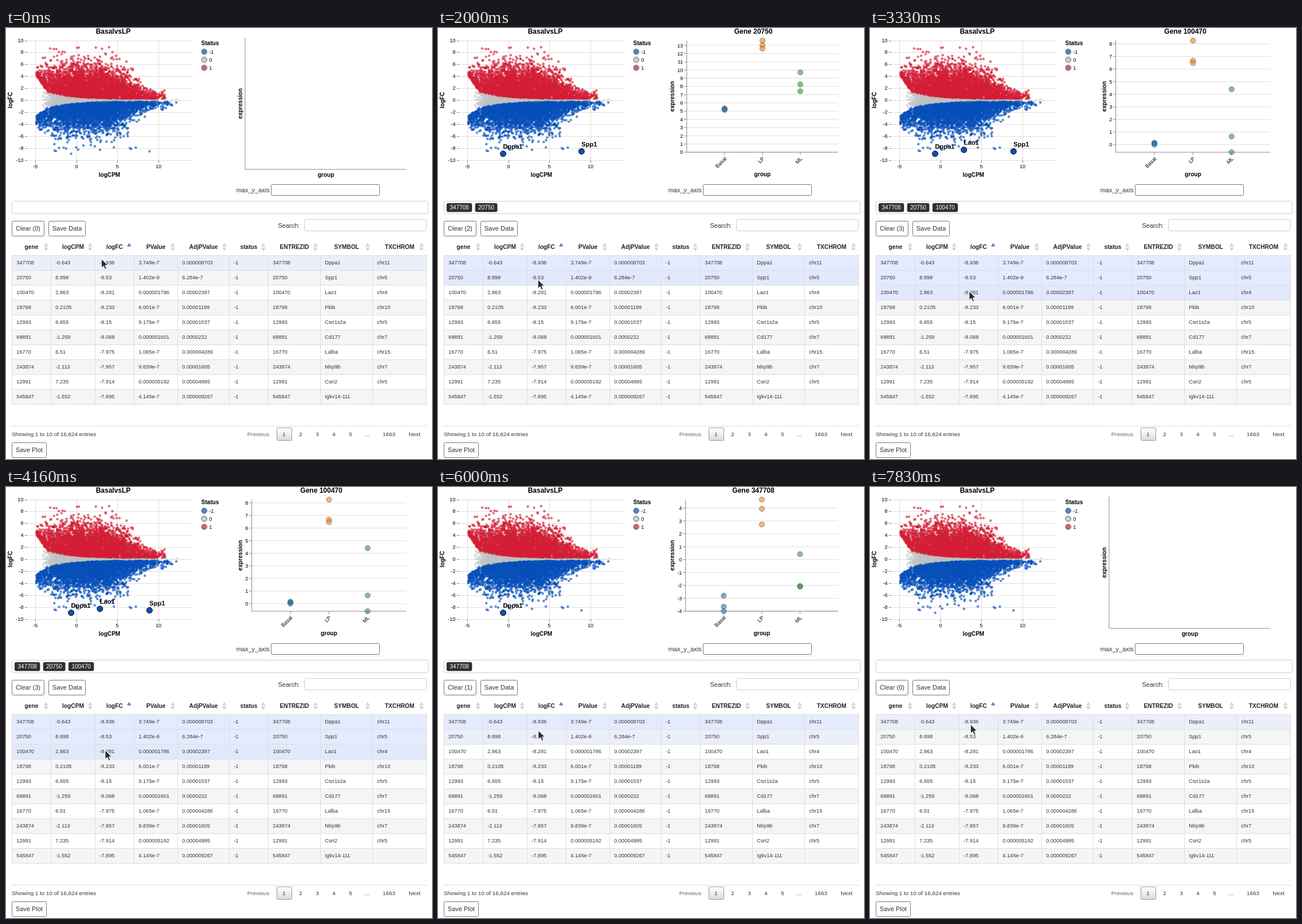
These frames come from a looping animation (743 px wide and 753 px high, 8000 ms). An HTML page with a canvas:

```html
<!DOCTYPE html>
<html lang="en">
<head>
<meta charset="utf-8">
<title>Gene explorer</title>
<style>
  html, body { margin: 0; width: 100%; height: 100%; overflow: hidden; background: #fff; }
  canvas, svg { position: absolute; left: 0; top: 0; width: 743px; height: 753px; }
  text { font-family: "Liberation Sans", Arial, sans-serif; white-space: pre; }
</style>
</head>
<body>
<canvas id="cloud" width="743" height="753"></canvas>
<svg id="stage" viewBox="0 0 743 753">
  <defs>
    <linearGradient id="pressed" x2="0" y2="1">
      <stop offset="0" stop-color="#fff"/><stop offset="1" stop-color="#dcdcdc"/>
    </linearGradient>
  </defs>
</svg>
<script>
const stage = document.getElementById('stage');
const BLUE = '#0850ba', SILVER = '#c0c0c0', RED = '#d21f35';
const LOOP = 8000;

// --- drawing helpers ---
function add(parent, tag, attrs, content) {
  const node = document.createElementNS('http://www.w3.org/2000/svg', tag);
  for (const key in attrs) node.setAttribute(key, attrs[key]);
  if (content !== undefined) node.textContent = content;
  parent.appendChild(node);
  return node;
}
// y is the vertical middle of the capitals
const label = (parent, x, y, content, size, attrs = {}) =>
  add(parent, 'text', { x, y: Math.round(y + size * .36), 'font-size': size, fill: '#333', ...attrs }, content);
const bold = { 'font-weight': 'bold', fill: '#000' };
const mid = { 'text-anchor': 'middle' };
const end = { 'text-anchor': 'end' };
const line = (parent, x1, y1, x2, y2, stroke) =>
  add(parent, 'line', { x1, y1, x2, y2, stroke });
const box = (parent, x, y, width, height, stroke, rx = 2, fill = '#fff') =>
  add(parent, 'rect', { x, y, width, height, rx, stroke, fill });
const group = parent => add(parent, 'g', {});
const turned = (parent, x, y, content) =>
  label(parent, 0, 0, content, 10.1, { ...bold, ...mid, transform: `translate(${x} ${y}) rotate(-90)` });

// --- left plot ---
const px = v => 122.8 + v * 14.33;
const py = v => 126.2 - v * 10.47;

function seeded(seed) {
  return () => {
    seed = (seed + 0x6D2B79F5) | 0;
    let t = Math.imul(seed ^ seed >>> 15, 1 | seed);
    t = t + Math.imul(t ^ t >>> 7, 61 | t) ^ t;
    return ((t ^ t >>> 14) >>> 0) / 4294967296;
  };
}

function drawCloud() {
  const ctx = document.getElementById('cloud').getContext('2d');
  const random = seeded(41);
  const gauss = () => Math.sqrt(-2 * Math.log(1 - random())) * Math.cos(2 * Math.PI * random());
  const dot = (v, value, r) => {
    ctx.beginPath();
    ctx.arc(px(v), py(value), r, 0, 2 * Math.PI);
    ctx.fill();
  };
  // smallest coloured value, and the height the bulk of the cloud reaches
  const edge = v => .22 + 1.1 * Math.exp(-(v + 3.3) / 3);
  const reach = v => 1.3 + 5.8 / (1 + Math.exp((v - 7) / 1.1)) - Math.max(0, -3 - v);

  ctx.strokeStyle = '#ddd';
  ctx.beginPath();
  for (let v = -10; v <= 10; v += 2) {
    const y = Math.round(py(v)) + .5;
    ctx.moveTo(37, y); ctx.lineTo(324, y);
  }
  for (let v = -5; v <= 10; v += 5) {
    const x = Math.round(px(v)) + .5;
    ctx.moveTo(x, 21); ctx.lineTo(x, 231);
  }
  ctx.stroke();

  ctx.fillStyle = SILVER;
  ctx.globalAlpha = .75;
  for (let i = 0; i < 8000; i++) {
    const v = .5 + 3.7 * gauss();
    if (v > -4.2 && v < 13 && random() < (v + 4.2) * .8)
      dot(v, (random() * 2 - 1) * Math.min(edge(v) + .1, 1.5), .9);
  }

  function side(color, sign, count, height, lift, rightmost) {
    ctx.fillStyle = color;
    ctx.globalAlpha = .65;
    for (let i = 0; i < count; i++) {
      const v = 1.8 + 3.65 * gauss();
      const low = edge(v) * (.9 + .2 * random()) + Math.max(0, -3.5 - v) * lift;
      const stretch = random() < .012 ? 1.5 : 1;
      const value = low + Math.max(.5, reach(v) * height - low) * Math.abs(gauss()) * .39 * stretch;
      if (v > -4.9 && v < rightmost && value < 9.4) dot(v, sign * value, 2.2);
    }
  }
  side(BLUE, -1, 3500, .9, .4, 12.3);
  side(RED, 1, 3700, 1, 1.5, 10.8);
  ctx.fillStyle = BLUE;
  for (const [id, cpm, fc] of genes) dot(+cpm, +fc, 2.2);
}

function drawLeftAxes(g) {
  for (let v = -10; v <= 10; v += 2) {
    const y = Math.round(py(v));
    line(g, 32.5, y + .5, 37, y + .5, '#888');
    label(g, 30.5, y, v, 9.2, { ...end, fill: '#000' });
  }
  for (let v = -5; v <= 10; v += 5) {
    const x = Math.round(px(v));
    line(g, x + .5, 231, x + .5, 236, '#888');
    label(g, x, 242, v, 9.2, { ...mid, fill: '#000' });
  }
  label(g, 187, 6, 'BasalvsLP', 12, { ...bold, ...mid });
  label(g, 180.5, 256, 'logCPM', 10.1, { ...bold, ...mid });
  turned(g, 6.5, 126, 'logFC');
  label(g, 340.5, 26, 'Status', 10.1, bold);
  [BLUE, SILVER, RED].forEach((fill, i) => {
    const y = 41.5 + 14 * i;
    add(g, 'circle', { cx: 345.7, cy: y, r: 4.6, fill, stroke: '#000', opacity: .7 });
    label(g, 354.3, y, i - 1, 9.2, { fill: '#000' });
  });
}

// --- table and controls ---
const columns = [10.5, 78.5, 155.5, 223.5, 299.5, 389.5, 457.5, 548.5, 639.5, 733.5];
const headers = ['gene', 'logCPM', 'logFC', 'PValue', 'AdjPValue', 'status', 'ENTREZID', 'SYMBOL', 'TXCHROM'];
const genes = `347708 -0.643 -8.936 3.749e-7 0.000008703 Dppa1 chr11
20750 8.898 -8.53 1.402e-9 6.284e-7 Spp1 chr5
100470 2.863 -8.281 0.000001786 0.00002397 Lao1 chr4
18768 0.2105 -8.233 6.001e-7 0.00001189 Pkib chr10
12993 6.655 -8.15 9.175e-7 0.00001537 Csn1s2a chr5
68891 -1.259 -8.068 0.000001601 0.0000222 Cd177 chr7
16770 6.51 -7.975 1.065e-7 0.000004286 Lalba chr15
243874 -2.113 -7.957 9.839e-7 0.00001605 Nlrp9b chr7
12991 7.235 -7.914 0.000005192 0.00004995 Csn2 chr5
545847 -1.552 -7.895 4.145e-7 0.000009267 Igkv14-111`.split('\n').map(row => row.split(' '));
const ROW_TOP = 397, ROW_HEIGHT = 26;
const rowFills = [];
let clearLabel;

function button(g, x, y, width, height, caption) {
  box(g, x, y, width, height, '#777');
  return label(g, x + width / 2, y + height / 2, caption, 11.05, mid);
}

function drawTable(g) {
  headers.forEach((name, i) => {
    label(g, (columns[i] + columns[i + 1]) / 2, 382, name, 10.2, { ...bold, ...mid, fill: '#222' });
    const cx = columns[i + 1] - 8.7;
    const sorted = name === 'logFC';
    add(g, 'path', { d: `M${cx - 4} 381.5h8l-4 -6z`, fill: sorted ? '#6b7bd6' : '#d3d3d3' });
    if (!sorted) add(g, 'path', { d: `M${cx - 4} 383.5h8l-4 6z`, fill: '#d3d3d3' });
  });
  genes.forEach((gene, i) => {
    const y = ROW_TOP + ROW_HEIGHT * i;
    rowFills.push(add(g, 'rect', { x: 10, y, width: 723, height: ROW_HEIGHT }));
    const cells = [...gene.slice(0, 5), '-1', gene[0], ...gene.slice(5)];
    cells.forEach((cell, c) => label(g, columns[c] + 7.8, y + 13, cell, 9.2));
  });
  for (let i = 0; i <= genes.length; i++) {
    const y = ROW_TOP + ROW_HEIGHT * i + .5;
    line(g, 10, y, 734, y, '#ddd');
  }
  for (const x of columns) line(g, x, ROW_TOP, x, ROW_TOP + ROW_HEIGHT * genes.length, '#ddd');
}

function drawControls(g) {
  label(g, 401.7, 283, 'max_y_axis', 11);
  box(g, 462.5, 273.5, 189, 19, '#767676');
  box(g, 10.5, 302.5, 726, 22, '#ccc', 3);
  clearLabel = button(g, 10.5, 337.5, 56, 26, '');
  button(g, 74.5, 337.5, 64, 26, 'Save Data');
  button(g, 10.5, 724.5, 60, 26, 'Save Plot');
  label(g, 474.5, 345.5, 'Search:', 11);
  box(g, 520.5, 334.5, 213, 20, '#ccc', 3);

  line(g, 10, 695.5, 734, 695.5, '#ddd');
  label(g, 10.3, 709, 'Showing 1 to 10 of 16,624 entries', 9.87);
  box(g, 472.5, 698.5, 26, 22, '#979797', 2, 'url(#pressed)');
  const page = (x, caption, fill = '#333') => label(g, x, 709, caption, 9.87, { ...mid, fill });
  page(440, 'Previous', '#666');
  [...'12345…'].forEach((caption, i) => page(485 + 29 * i, caption));
  page(668, '1663');
  page(712.5, 'Next');
}

// --- parts that follow the selection ---
const TOP = 22, BOTTOM = 217, RIGHT = 698;
const groupStyles = [['Basal', '#1f77b4'], ['LP', '#ff7f0e'], ['ML', '#2ca02c']];
// three samples per group for each of the first three genes
const expression = [
  [[-2.8, -3.65, -4], [4.65, 3.94, 2.72], [.42, -2.05, -2.1]],
  [[5.32, 5.22, 5.15], [13.57, 13, 12.6], [9.7, 8.25, 7.41]],
  [[.15, .1, 0], [8.26, 6.67, 6.47], [4.4, .65, -.6]]
];

function drawExpression(g, count) {
  if (!count) {
    line(g, 417, 17, 417, 247, '#888');
    line(g, 417, 247, RIGHT, 247, '#888');
    turned(g, 407.5, 132, 'expression');
    label(g, 558, 256, 'group', 10.1, { ...bold, ...mid });
    return;
  }
  const samples = expression[count - 1];
  const low = Math.min(0, ...samples.flat()), high = Math.max(...samples.flat());
  const y = v => BOTTOM + (TOP - BOTTOM) * (v - low) / (high - low);
  const first = Math.ceil(low), last = Math.floor(high);
  // the widest tick label pushes the axis to the right
  const textWidth = v => 9.2 * (.556 * String(Math.abs(v)).length + (v < 0 ? .333 : 0));
  const left = 423.6 + Math.max(textWidth(first), textWidth(last));
  const step = (RIGHT - left) / 4;

  for (let v = first; v <= last; v++) {
    line(g, left, y(v), RIGHT, y(v), '#ddd');
    line(g, left - 4.6, y(v), left, y(v), '#888');
    label(g, left - 6.4, y(v), v, 9.2, { ...end, fill: '#000' });
  }
  line(g, left, TOP, left, BOTTOM + .5, '#888');
  line(g, left, BOTTOM, RIGHT, BOTTOM, '#888');
  samples.forEach((values, i) => {
    const x = left + step * (i + 1);
    const [name, fill] = groupStyles[i];
    line(g, x, BOTTOM, x, BOTTOM + 5, '#888');
    add(g, 'text', { ...end, 'font-size': 9.2, transform: `translate(${x + 4} 229) rotate(-45)` }, name);
    for (const v of values)
      add(g, 'circle', { cx: x, cy: y(v), r: 4.6, fill, stroke: '#333', 'stroke-width': .9, opacity: .6 });
  });
  label(g, 550, 6, 'Gene ' + genes[count - 1][0], 12, { ...bold, ...mid });
  label(g, left + step * 2, 255, 'group', 10.1, { ...bold, ...mid });
  turned(g, 407.5, (TOP + BOTTOM) / 2, 'expression');
}

function drawSelection(g, count) {
  g.replaceChildren();
  drawExpression(g, count);
  let tagX = 15;
  genes.slice(0, count).forEach(([id, cpm, fc, , , symbol]) => {
    const x = px(+cpm), y = py(+fc);
    add(g, 'circle', { cx: x, cy: y, r: 5, fill: BLUE, stroke: '#000' });
    label(g, x, y - 13, symbol, 11.1, bold);
    const width = id.length * 5.57 + 11;
    add(g, 'rect', { x: tagX, y: 306, width, height: 15.5, rx: 3, fill: '#303030' });
    label(g, tagX + width / 2, 313.7, id, 10, { ...mid, fill: '#fff' });
    tagX += width + 5.3;
  });
  clearLabel.textContent = `Clear (${count})`;
}

// --- timeline ---
const clicks = [[660, 1], [1660, 2], [3160, 3], [4500, 2], [5330, 1], [6830, 0]];
const moves = [
  { from: 830, to: 1330, x: 175, y: 429 },
  { from: 1830, to: 2330, x: 173, y: 460 },
  { from: 4500, to: 4830, x: 174, y: 444 },
  { from: 5500, to: 6000, x: 175, y: 425.5 },
  { from: 6000, to: 6500, x: 175.5, y: 415 }
];

function pointerAt(t) {
  let x = 166.5, y = 403.5;
  for (const move of moves) {
    const k = Math.min(1, Math.max(0, (t - move.from) / (move.to - move.from)));
    x += (move.x - x) * k;
    y += (move.y - y) * k;
  }
  return [x, y];
}

// the picture advances six times a second, on 10 ms marks
function stepTime(t) {
  const step = Math.ceil((Math.floor(t / 10) + 1) * 6 / 100) - 1;
  return Math.floor(step * 100 / 6) * 10;
}

function rowFill(i, count, hovered) {
  if (i < count) return i === hovered ? '#e2e9fb' : '#e4ebfe';
  if (i === hovered) return '#ebeffa';
  return i % 2 ? '#f5f5f5' : '#fff';
}

drawCloud();
drawLeftAxes(group(stage));
drawTable(group(stage));
drawControls(group(stage));
const selection = group(stage);
const pointer = add(stage, 'path', {
  d: 'M0 0V15.5L3.7 12.2L6.2 17.8L8.8 16.7L6.4 11.2H11.3Z',
  fill: '#2b2b2b', stroke: '#fff', 'stroke-width': .9, 'stroke-linejoin': 'round'
});
let shown = -1;

function render(time) {
  const t = stepTime(time % LOOP);
  const count = clicks.reduce((n, [at, value]) => t >= at ? value : n, 0);
  const [x, y] = pointerAt(t);
  const hovered = Math.floor((y - ROW_TOP) / ROW_HEIGHT);
  if (count !== shown) drawSelection(selection, shown = count);
  rowFills.forEach((rect, i) => rect.setAttribute('fill', rowFill(i, count, hovered)));
  pointer.setAttribute('transform', `translate(${x} ${y})`);
}

const start = performance.now();
function tick() {
  render(performance.now() - start);
  requestAnimationFrame(tick);
}
tick();
</script>
</body>
</html>
```
